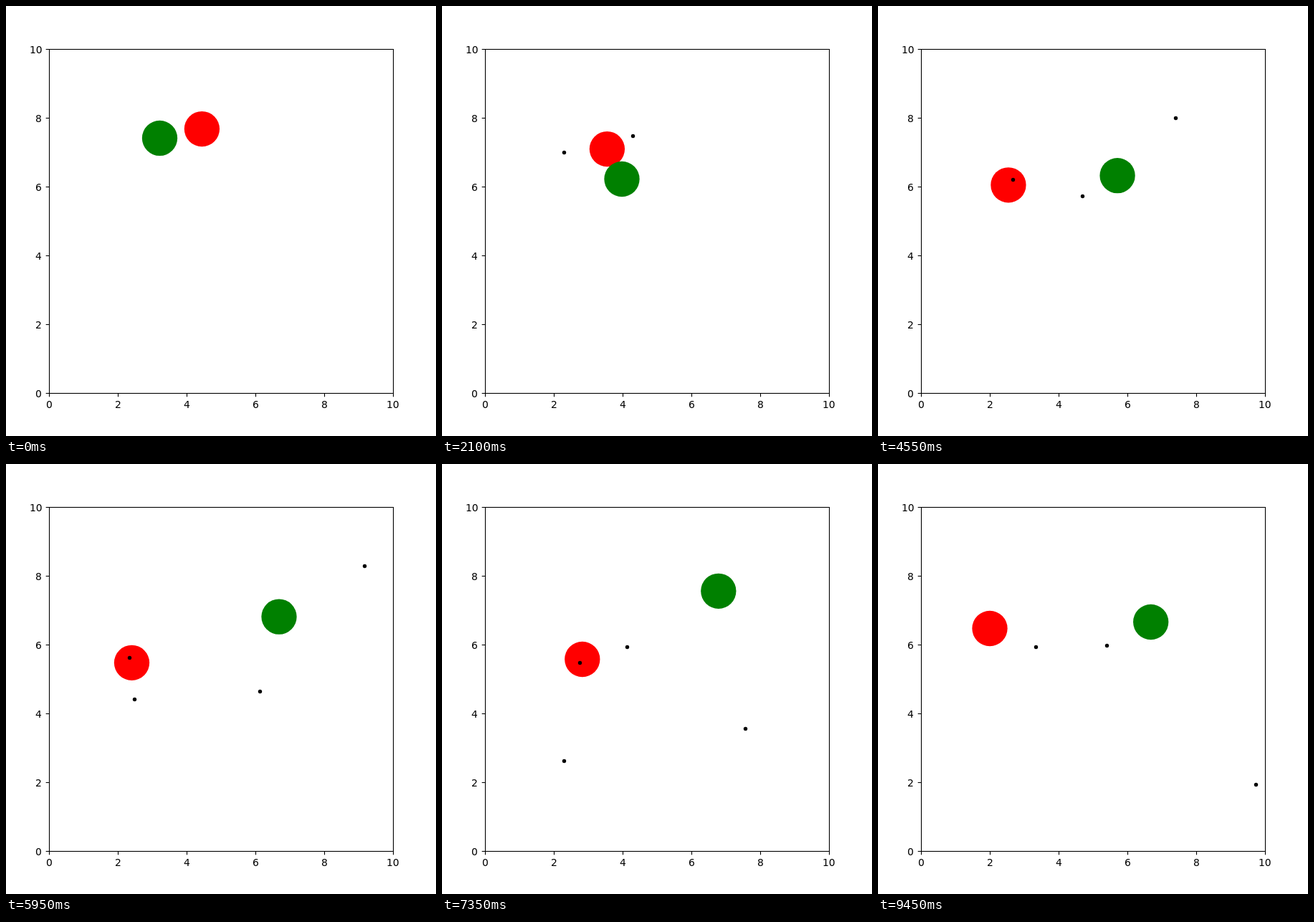
Write an HTML page with a canvas that moves like this. It is 600 px wide and 600 px high and loops after 9800 ms.

```html
<!DOCTYPE html>
<html lang="en">
<head>
<meta charset="utf-8">
<title>Two discs</title>
<style>
html, body { margin: 0; width: 100%; height: 100%; overflow: hidden; background: #fff; }
canvas { display: block; width: 600px; height: 600px; }
</style>
</head>
<body>
<canvas id="stage" width="600" height="600"></canvas>
<script>
const ctx = document.getElementById('stage').getContext('2d');
const STEP = 350, STEPS = 28;
const LEFT = 60, TOP = 60, SIZE = 480, BOTTOM = TOP + SIZE;
const RADIUS = 24.65, DOT = 2.7;

// One key point every KEY steps
const KEY = 3;
const redPath = [
  [273.4, 171.6], [252, 179], [230.4, 199.6], [209, 221], [188.3, 242.7],
  [172.8, 263.4], [179.2, 281.2], [195.8, 272.5], [177, 250.5], [156, 229.5]
];
const greenPath = [
  [214.5, 184.4], [223, 216.5], [251, 241.5], [287.6, 247.5], [322, 240.8],
  [358, 226], [388.5, 205.5], [385.8, 177.3], [386, 193], [380.7, 220.5]
];

// Red fires every RELOAD steps, each time in a new direction (degrees)
const RELOAD = 4, SPEED = 21.62;
const aims = [162.4, -9.4, 36.9, 95.8, -10.3, -10.7, 6];

// Catmull-Rom curve through the key points
function along(path, step) {
  const last = path.length - 1;
  const i = Math.min(Math.floor(step / KEY), last - 1);
  const u = step / KEY - i;
  return [0, 1].map(k => {
    const b = path[i][k], c = path[i + 1][k];
    const a = i > 0 ? path[i - 1][k] : 2 * b - c;
    const d = i + 2 <= last ? path[i + 2][k] : 2 * c - b;
    return b + u / 2 * (c - a + u * (2 * a - 5 * b + 4 * c - d + u * (3 * (b - c) + d - a)));
  });
}

function disc([x, y], r, color) {
  ctx.fillStyle = color;
  ctx.beginPath();
  ctx.arc(x, y, r, 0, Math.PI * 2);
  ctx.fill();
}

function line(x1, y1, x2, y2) {
  ctx.beginPath();
  ctx.moveTo(x1, y1);
  ctx.lineTo(x2, y2);
  ctx.stroke();
}

// Places text on whole pixels; align is the share of its width left of x
function label(text, x, y, align) {
  ctx.fillText(text, Math.round(x - ctx.measureText(text).width * align), y);
}

function drawAxes() {
  ctx.strokeStyle = ctx.fillStyle = '#000';
  ctx.lineWidth = 1.11;
  ctx.strokeRect(LEFT + 0.5, TOP + 0.5, SIZE, SIZE);
  ctx.font = '13.889px "DejaVu Sans", sans-serif';
  for (let n = 0; n <= 10; n += 2) {
    const x = LEFT + n * SIZE / 10, y = BOTTOM - n * SIZE / 10;
    line(x + 0.5, BOTTOM + 0.5, x + 0.5, BOTTOM + 5.36);
    line(LEFT + 0.5, y + 0.5, LEFT - 4.36, y + 0.5);
    label(n, x, BOTTOM + 21, 0.5);
    label(n, LEFT - 9.72, y + 6, 1);
  }
}

function drawShots(step, target) {
  aims.forEach((deg, n) => {
    const fired = n * RELOAD, age = step - fired - 1;
    if (age < 0) return;
    const [x0, y0] = along(redPath, fired);
    const angle = deg * Math.PI / 180;
    const x = x0 + SPEED * age * Math.cos(angle);
    const y = y0 + SPEED * age * Math.sin(angle);
    const inside = x > LEFT && x < LEFT + SIZE && y > TOP && y < BOTTOM;
    const hit = Math.hypot(x - target[0], y - target[1]) < RADIUS;
    if (inside && !hit) disc([Math.floor(x) + 0.5, Math.floor(y) + 0.5], DOT, '#000');
  });
}

function draw(step) {
  const green = along(greenPath, step);
  ctx.fillStyle = '#fff';
  ctx.fillRect(0, 0, 600, 600);
  disc(along(redPath, step), RADIUS, '#ff0000');
  disc(green, RADIUS, '#008000');
  drawShots(step, green);
  drawAxes();
}

const start = performance.now();
function tick() {
  const t = Math.max(0, performance.now() - start);
  draw(Math.floor(t / STEP) % STEPS);
  requestAnimationFrame(tick);
}
tick();
</script>
</body>
</html>
```
